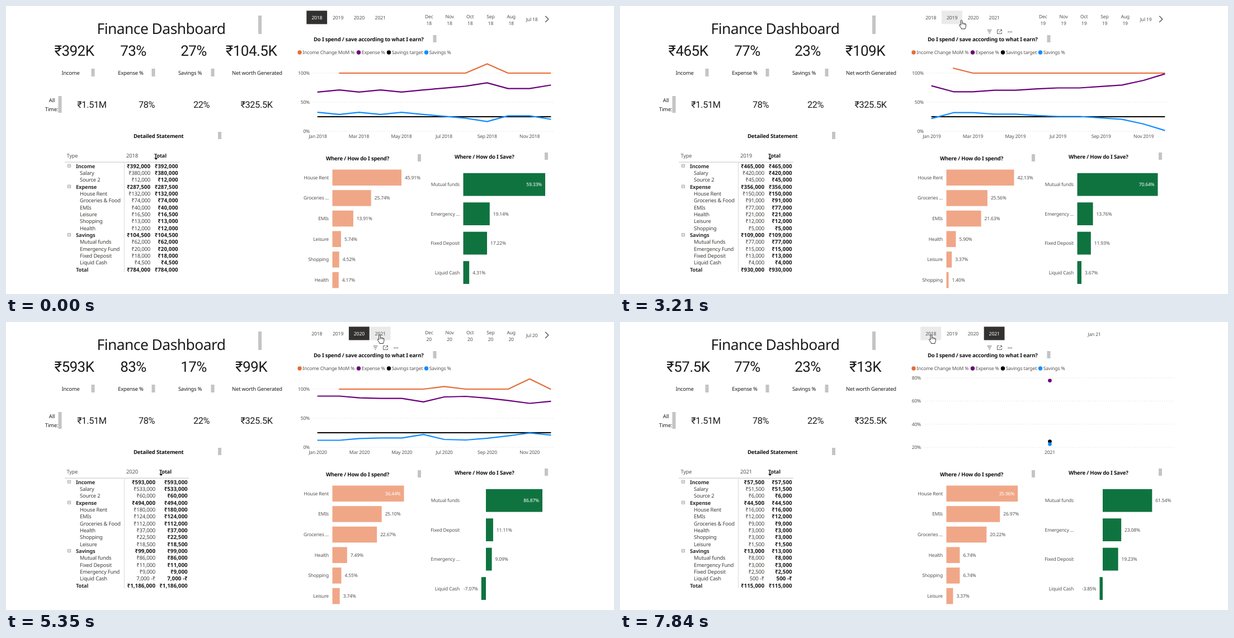
An HTML page for the animation above (8 s loop, 1087 px wide and 515 px high).

```html
<!DOCTYPE html>
<html lang="en">
<head>
<meta charset="utf-8">
<title>Finance Dashboard</title>
<style>
  html, body { margin: 0; width: 100%; height: 100%; overflow: hidden; background: #fff; }
  svg { display: block; width: 1087px; height: 515px; text-rendering: geometricPrecision; }
  text { font-family: "Noto Sans", "Open Sans", sans-serif; letter-spacing: -.02em; }
  .num { font-family: Roboto, "Noto Sans", sans-serif; letter-spacing: -.02em; }
  .sum { letter-spacing: 0; }
</style>
</head>
<body>
<svg viewBox="0 0 1087 515">
  <g id="fixed"></g><g id="kpi"></g><g id="lines"></g><g id="bars"></g>
  <g id="table"></g><g id="months"></g><g id="years"></g><g id="pointer"></g>
</svg>
<script>
const LOOP = 8000;
const GREY = '#555250', INK = '#1c1b1a';
const ORANGE = '#e66c37', PURPLE = '#6b007b', BLUE = '#118dff';
const SPEND = '#f0a787', SAVE = '#0f7340';

// Amounts in thousands, rows in display order; expense and income shares in percent per month.
const YEARS = [
  { income: { 'Salary': 380, 'Source 2': 12 },
    expense: { 'House Rent': 132, 'Groceries & Food': 74, 'EMIs': 40, 'Leisure': 16.5, 'Shopping': 13, 'Health': 12 },
    savings: { 'Mutual funds': 62, 'Emergency Fund': 20, 'Fixed Deposit': 18, 'Liquid Cash': 4.5 },
    share: [67.5, 71, 67.5, 71, 67.5, 71, 74.2, 77.5, 83.3, 73.5, 73.5, 79.3],
    change: { 8: 116 }, spendW: 123.5, saveX: 817.5, saveW: 146.5, inSave: true },
  { income: { 'Salary': 420, 'Source 2': 45 },
    expense: { 'House Rent': 150, 'Groceries & Food': 91, 'EMIs': 77, 'Health': 21, 'Leisure': 12, 'Shopping': 5 },
    savings: { 'Mutual funds': 77, 'Emergency Fund': 15, 'Fixed Deposit': 13, 'Liquid Cash': 4 },
    share: [78, 68, 68, 70.5, 70.5, 73, 74.5, 74.5, 77, 79.5, 87.5, 98.5],
    change: { 1: 108.5 }, spendW: 121, saveX: 817.5, saveW: 144, inSave: true },
  { income: { 'Salary': 533, 'Source 2': 60 },
    expense: { 'House Rent': 180, 'EMIs': 124, 'Groceries & Food': 112, 'Health': 37, 'Shopping': 22.5, 'Leisure': 18.5 },
    savings: { 'Mutual funds': 86, 'Fixed Deposit': 11, 'Emergency Fund': 9, 'Liquid Cash': -7 },
    share: [88, 88, 85, 84, 84, 78, 86.5, 87.5, 84.5, 80.5, 75.5, 79],
    change: { 6: 104.5, 10: 117.5 }, spendW: 128, saveX: 858, saveW: 101, inSpend: true, inSave: true },
  { income: { 'Salary': 51.5, 'Source 2': 6 },
    expense: { 'House Rent': 16, 'EMIs': 12, 'Groceries & Food': 9, 'Health': 3, 'Shopping': 3, 'Leisure': 1.5 },
    savings: { 'Mutual funds': 8, 'Emergency Fund': 3, 'Fixed Deposit': 2.5, 'Liquid Cash': -.5 },
    spendW: 127.7, saveX: 863, saveW: 88.3, inSpend: true }
];

// Times at which each part switches to the next year.
const PICK = [2270, 4410, 6180];
const CHARTS = [2470, 4740, 6510];
const MONTHS = [2530, 4810, 6580];
const TABLE = [2530, 4810, 6650];

// Fingertip positions: time, x, y; each holds until the next.
const PATH = [
  ...Array.from({ length: 11 }, (_, i) => {
    const k = 1 - (1 - i / 10) ** 1.6;
    return [440 + 70 * i, 985 - 382.5 * k, 500 - 476 * k];
  }),
  [2470, 603, 24], [3210, 610.5, 25.5], [3280, 622, 25], [3350, 635.5, 24],
  [5140, 640, 24], [5210, 649, 23.5], [5280, 660, 23], [5350, 668, 23], [5410, 669.5, 23],
  [5610, 670, 22.5], [5740, 671, 22.5],
  [6980, 666, 23], [7050, 636, 24], [7120, 598, 24], [7190, 569, 24], [7250, 559, 24],
  [7450, 560, 24], [7580, 559, 23.5], [7710, 557.5, 23], [7840, 556.5, 23]
];
const TIPS = [[1730, 2000, 2019], [3880, 4010, 2020]];

const sum = o => Object.values(o).reduce((a, b) => a + b, 0);
const esc = s => String(s).replace('&', '&amp;');
const range = (n, f) => Array.from({ length: n }, (_, i) => f(i)).join('');

// y is the middle of the capitals.
function text(x, y, s, size = 8.5, { anchor = 'start', fill = GREY, bold = false, cls = '' } = {}) {
  return `<text x="${x}" y="${y + size * .357}" font-size="${size}" text-anchor="${anchor}" fill="${fill}"` +
    `${bold ? ' font-weight="700"' : ''}${cls ? ` class="${cls}"` : ''}>${esc(s)}</text>`;
}
const mid = (x, y, s, size, o) => text(x, y, s, size, { anchor: 'middle', ...o });
const end = (x, y, s, size, o) => text(x, y, s, size, { anchor: 'end', ...o });
const rect = (x, y, w, h, fill) => `<rect x="${x}" y="${y}" width="${w}" height="${h}" fill="${fill}"/>`;
const dot = (x, y, r, fill) => `<circle cx="${x}" cy="${y}" r="${r}" fill="${fill}"/>`;
const stroke = (d, color, w = 1, more = '') =>
  `<path d="${d}" fill="none" stroke="${color}" stroke-width="${w}" ${more}/>`;

function drawFixed() {
  const thumbs = [[451, 17, 33], [152.5, 112, 14], [260.5, 112, 14], [366.5, 112, 14], [93.5, 161, 30],
    [379, 225, 13], [763.5, 52, 13], [736, 265, 13], [963, 262, 13]];
  const titles = [[228, 233, 'Detailed Statement'], [550, 60, 'Do I spend / save according to what I earn?'],
    [572, 273, 'Where / How do I spend?'], [802, 270, 'Where / How do I Save?']];
  const legend = [[525, 'Income Change MoM %', ORANGE], [630.5, 'Expense %', PURPLE],
    [684.5, 'Savings target', '#000'], [751.5, 'Savings %', BLUE]];
  const names = [[115.5, 'Income'], [223, 'Expense %'], [329, 'Savings %'], [449, 'Net worth Generated']];
  const allTime = [[153.5, '₹1.51M'], [251.5, '78%'], [349.5, '22%'], [448, '₹325.5K']];
  return text(162.5, 41, 'Finance Dashboard', 26.4, { fill: INK }) +
    thumbs.map(([x, y, h]) => rect(x, y, 6, h, '#c4c4c4')).join('') +
    titles.map(([x, y, s]) => text(x, y, s, 9.55, { bold: true, fill: '#111' })).join('') +
    legend.map(([x, s, c]) => dot(x, 83, 3.7, c) + text(x + 5.3, 83, s, 8.6)).join('') +
    names.map(([x, s]) => mid(x, 120, s, 9.4, { fill: INK })).join('') +
    allTime.map(([x, s]) => mid(x, 176.5, s, 16.3, { cls: 'num', fill: INK })).join('') +
    mid(82, 169, 'All', 9.4, { fill: INK }) + mid(81.5, 184.5, 'Time:', 9.4, { fill: INK });
}

function drawKpi(n) {
  const y = YEARS[n], income = sum(y.income), saved = sum(y.savings);
  const pct = v => Math.round(v / income * 100) + '%';
  return [[122, `₹${income}K`], [227.5, pct(sum(y.expense))], [335.5, pct(saved)], [438.5, `₹${saved}K`]]
    .map(([x, s]) => mid(x, 80, s, 26, { cls: 'num', fill: INK })).join('');
}

function drawLines(n) {
  const grid = (x1, x2, y) => stroke(`M${x1} ${y}H${x2}`, '#d4d4d4', 1, 'stroke-dasharray="1 3"');
  const year = 2018 + n, y = YEARS[n];
  if (!y.share) {
    return range(4, i => {
      const gy = 100 + i * 41.4;
      return grid(545, 991, gy) + end(538, gy, 80 - 20 * i + '%');
    }) + mid(768.5, 233, year) +
      dot(768.5, 104.7, 3.3, PURPLE) + dot(768.5, 213.5, 3.3, '#000') + dot(768.5, 218.5, 3.3, BLUE);
  }
  const day = m => (Date.UTC(year, m) - Date.UTC(year, 0)) / 864e5;
  const px = m => 557.5 + 416 * day(m) / day(11);
  const py = v => 224 - 1.04 * v;
  const line = (vals, color, from = 0) => stroke(
    'M' + vals.slice(from).map((v, i) => `${px(i + from).toFixed(1)} ${py(v).toFixed(1)}`).join('L'),
    color, 2.2, 'stroke-linejoin="round" stroke-linecap="round"');
  return [0, 50, 100].map(v => grid(549, 981, py(v)) + end(543, py(v), v + '%')).join('') +
    ['Jan', 'Mar', 'May', 'Jul', 'Sep', 'Nov'].map((m, i) => mid(px(2 * i), 233, `${m} ${year}`)).join('') +
    line(y.share.map((_, i) => y.change[i] || 100), ORANGE, 1) +
    line(y.share, PURPLE) +
    line(y.share.map(() => 25), '#000') +
    line(y.share.map(v => 100 - v), BLUE);
}

function barChart(items, { x, nameX, y, pitch, h, w, color, inside }) {
  const total = sum(items), top = Object.values(items)[0];
  return Object.entries(items).map(([name, v], i) => {
    const len = v / top * w, cy = y + i * pitch, tip = x + len;
    const label = (v / total * 100).toFixed(2) + '%';
    const short = name.length > 13 ? name.split(' ')[0] + ' ...' : name;
    const value = inside && !i ? end(tip - 6, cy, label, 8.5, { fill: '#fff' })
      : len < 0 ? end(tip - 6, cy, label) : text(tip + 6, cy, label);
    return rect(Math.min(x, tip), cy - h / 2, Math.abs(len), h, color) + end(nameX, cy, short) + value;
  }).join('');
}

function drawBars(n) {
  const y = YEARS[n];
  return barChart(y.expense, { x: 583.5, nameX: 577, y: 306.8, pitch: 36.65, h: 28.6, w: y.spendW, color: SPEND, inside: y.inSpend }) +
    barChart(y.savings, { x: y.saveX, nameX: 811, y: 319.2, pitch: 52.45, h: 40.8, w: y.saveW, color: SAVE, inside: y.inSave });
}

function drawTable(n) {
  const y = YEARS[n], wide = n === 2;
  const valueX = wide ? 267 : 258, totalX = wide ? 324.7 : 307.7, headX = wide ? 274 : 265;
  const rows = [];
  for (const key of ['income', 'expense', 'savings']) {
    rows.push([key[0].toUpperCase() + key.slice(1), sum(y[key]), 'group']);
    for (const [name, v] of Object.entries(y[key])) rows.push([name, v, 'item']);
  }
  rows.push(['Total', sum(y.income) + sum(y.expense) + sum(y.savings), 'total']);
  const money = v => {
    const s = (Math.abs(v) * 1000).toLocaleString('en-US');
    return v < 0 ? s + ' -₹' : '₹' + s;
  };
  const plain = { fill: '#3f3d3b' };
  const strong = { bold: true, fill: '#1a1a1a', cls: 'sum' };
  return text(108.5, 267.5, 'Type', 9.2) + text(215, 267.5, 2018 + n, 9.5) +
    text(headX, 267.5, 'Total', 9.2, { bold: true, fill: INK }) +
    `<path d="M${headX} 271.5h6.4l-3.2 3.4z" fill="#000"/>` +
    stroke(`M105 279.2H${wide ? 327 : 310}`, '#c4c4c4') + stroke('M211.5 280V476', '#d8d8d8') +
    rows.map(([name, v, kind], i) => {
      const cy = 286.2 + i * 12.34, item = kind === 'item';
      const box = kind === 'group'
        ? stroke(`M110.5 ${cy - 3}h5v5h-5zM111.5 ${cy - .5}h3`, '#8a8a8a', .8) : '';
      return box +
        text(item ? 132 : 125, cy, name, 9.4, item ? plain : { bold: true, fill: '#2f2f2f' }) +
        end(valueX, cy, money(v), item ? 9.5 : 9.8, item ? plain : strong) +
        end(totalX, cy, money(v), 9.8, strong);
    }).join('');
}

function drawMonths(n, blank) {
  if (blank) return '';
  if (n === 3) return mid(848, 21.5, 'Jan 21');
  return ['Dec', 'Nov', 'Oct', 'Sep', 'Aug'].map((m, i) =>
    mid(756.3 + 36.7 * i, 18.5, m) + mid(756.3 + 36.7 * i, 30.5, 18 + n)).join('') +
    mid(940, 24.3, `Jul ${18 + n}`) + stroke('M964.2 18l5.6 5.5-5.6 5.5', '#444', 1.2);
}

function drawYears(picked, hover, tools) {
  const buttons = range(4, i => {
    const x = 537.3 + 37.8 * i, dark = i === picked && i !== hover;
    const fill = dark ? '#323130' : i === hover ? '#eaeaea' : '';
    return (fill ? rect(x, 8.4, 36.8, 24, fill) : '') +
      mid(x + 18.5, 21.3, 2018 + i, 8.7, dark ? { fill: '#fff' } : {});
  });
  const icons = stroke('M656.5 43h8M658 46h5M659.5 49h2', '#555', 1) +
    stroke('M678 42.5h-3.5v7h8V47M679.5 42.5h3v3M682.5 42.5l-4.5 4.5', '#555', .9) +
    range(3, i => dot(694.3 + 2.9 * i, 46.3, .9, '#444'));
  return buttons + (tools ? icons : '');
}

function drawPointer(p, hand, tip) {
  if (!p) return '';
  const [, x, y] = p;
  const shape = hand
    ? 'M-1.4 1.2a1.4 1.4 0 0 1 2.8 0V5.4q2-.6 2.7.5 1.7-.5 2.3.7 1.9-.3 2 1.3V11q0 2-1.4 4.2V16.4H-.2V15.2Q-2 13-3.7 10q-.8-1.7.5-2 1-.1 1.8 1.4z'
    : 'M0 0V14l3.2-3 2.2 5 2-.9-2.2-4.8H9.6z';
  const lines = hand ? stroke('M1.4 5.4v3M4.1 5.9v2.6M6.4 6.6v2.2', '#222', .8) : '';
  return (tip ? rect(x + 7.5, 35, 25.5, 15, '#212121') + mid(x + 20.2, 42.6, tip, 8.5, { fill: '#fff' }) : '') +
    `<g transform="translate(${x} ${y}) scale(.94)"><path d="${shape}" fill="#fff" stroke="#222" stroke-linejoin="round"/>${lines}</g>`;
}

const shown = {};
function put(id, draw, ...args) {
  const key = JSON.stringify(args);
  if (shown[id] === key) return;
  shown[id] = key;
  document.getElementById(id).innerHTML = draw(...args);
}
const step = (times, t) => times.filter(s => t >= s).length;

function render(t) {
  const p = PATH.filter(k => t >= k[0]).pop();
  const overButtons = !!p && p[2] < 33 && p[1] >= 537 && p[1] < 688;
  const hover = overButtons ? Math.floor((p[1] - 537) / 37.8) : -1;
  const tip = TIPS.find(([a, b]) => t >= a && t < b);
  const chart = step(CHARTS, t), month = step(MONTHS, t);
  put('kpi', drawKpi, chart);
  put('lines', drawLines, chart);
  put('bars', drawBars, chart);
  put('table', drawTable, step(TABLE, t));
  put('months', drawMonths, month, chart === 3 && month < 3);
  put('years', drawYears, step(PICK, t), hover, !!p && p[2] < 50);
  put('pointer', drawPointer, p, overButtons, tip && tip[2]);
}

put('fixed', drawFixed);
const start = performance.now();
function tick() {
  render((performance.now() - start) % LOOP);
  requestAnimationFrame(tick);
}
tick();
</script>
</body>
</html>
```
